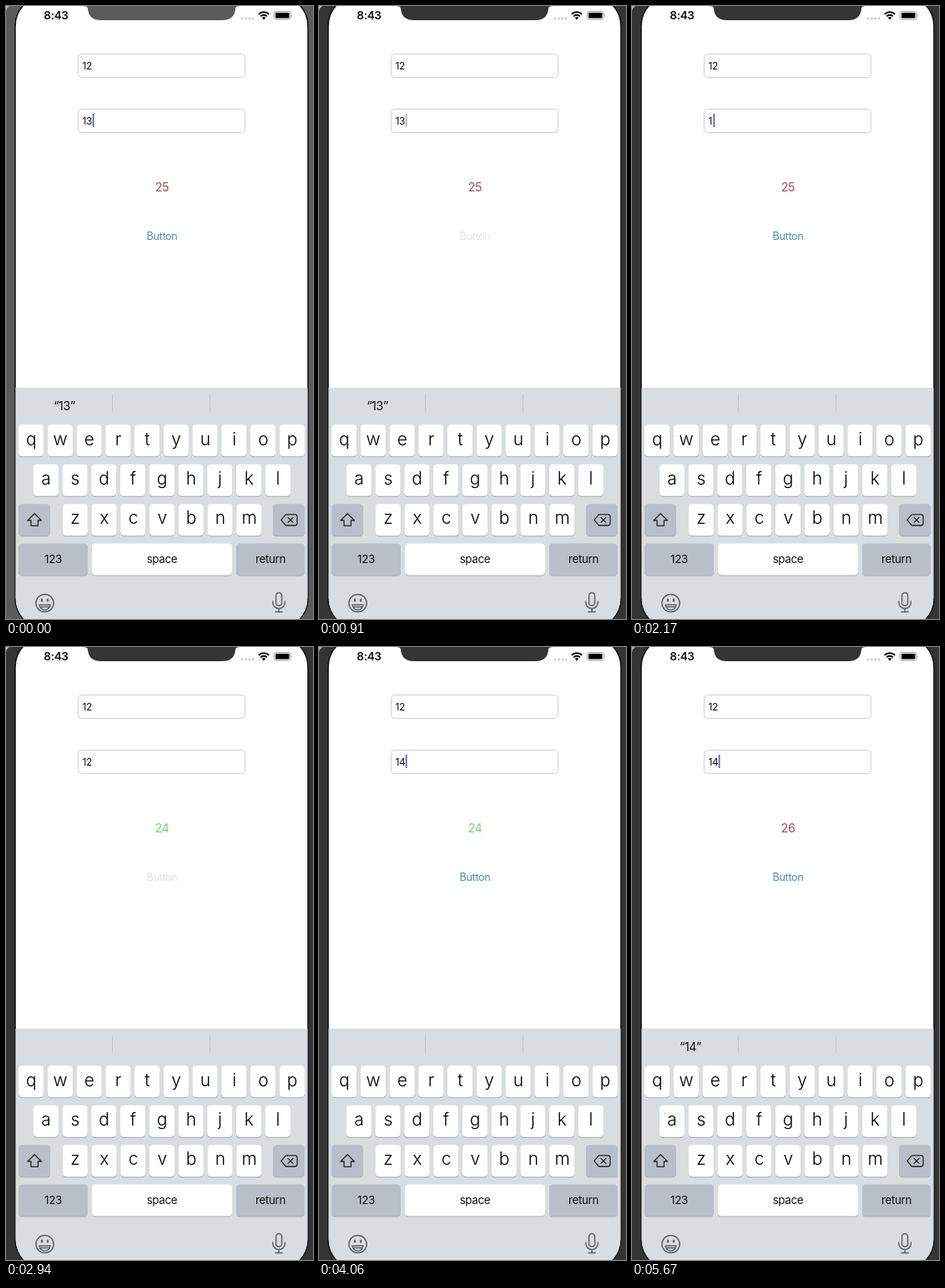
Recreate the animation shown at these times as an HTML page. Size 368x734 px, loop 5.74 s.

```html
<!DOCTYPE html>
<html lang="en">
<head>
<meta charset="utf-8">
<title>Adding two numbers</title>
<style>
  html, body { margin: 0; width: 100%; height: 100%; overflow: hidden; background: #343434; }
  svg { display: block; width: 368px; height: 734px; }
  text { font-family: Inter, "Liberation Sans", sans-serif; fill: #111; letter-spacing: -.025em; }
  .mid { text-anchor: middle; }
  .letter { font-size: 21px; font-weight: 300; fill: #000; }
  .word { font-size: 13.4px; }
  .field { fill: #fff; stroke: #d2d2d2; }
  .input { font-size: 12px; }
  .line { fill: none; stroke: #5f6368; stroke-width: 1.5; stroke-linecap: round; stroke-linejoin: round; }
  .dark { stroke: #26282b; stroke-width: 1.3; }
</style>
</head>
<body>
<svg viewBox="0 0 368 734">
  <defs>
    <clipPath id="screen"><rect x="11.5" y="-12" width="350" height="757" rx="36"/></clipPath>
  </defs>
  <rect id="bezel" width="368" height="734"/>
  <path d="M0 0H4Q1 2 0 6Z" fill="#b5b5b5"/>
  <rect x="11" y="-12.5" width="351" height="758" rx="36.5" fill="#fff" stroke="#141414" stroke-width="1.6"/>

  <g clip-path="url(#screen)">
    <rect x="11" y="457" width="351" height="280" fill="#d9dde0"/>
    <path d="M127.5 465V486M244.5 465V486" stroke="#c5c9cd"/>
    <g id="keys"></g>
  </g>

  <path id="notch" d="M92 0Q98 0 98 3Q99 17 114 17H259Q274 17 275 3Q275 0 281 0Z"/>
  <text x="60" y="16" class="mid" font-size="13.6" font-weight="600">8:43</text>
  <g fill="#c9c9c9">
    <circle cx="283" cy="15" r="1.4"/><circle cx="287.5" cy="15" r="1.4"/>
    <circle cx="292" cy="15" r="1.4"/><circle cx="296" cy="15" r="1.4"/>
  </g>
  <path d="M302.8 9.8a8.8 8.8 0 0 1 12.4 0M305.2 12.4a5.4 5.4 0 0 1 7.6 0" fill="none" stroke="#000" stroke-width="2"/>
  <path d="M309 16.4l-2.2-2.3a3 3 0 0 1 4.4 0z"/>
  <rect x="321.5" y="6.5" width="19.5" height="9.5" rx="2.6" fill="none" stroke="#999"/>
  <rect x="323" y="8" width="16.5" height="6.5" rx="1.3"/>
  <path d="M342.2 9.5q1.5 1.7 0 3.5z" fill="#999"/>

  <rect class="field" x="86.5" y="57.5" width="200" height="28" rx="4"/>
  <rect class="field" x="86.5" y="123.5" width="200" height="28" rx="4"/>
  <text class="input" x="91.5" y="75.5">12</text>
  <text class="input" x="91.5" y="141.5" id="entry"></text>
  <rect id="caret" y="129" width="1.7" height="16" fill="#4a60c8"/>
  <text id="sum" class="mid" x="187" y="222" font-size="14.4"></text>
  <text id="button" class="mid" x="187" y="280" font-size="12.6">Button</text>
  <text id="hint" class="mid" x="70" y="483.5" font-size="14.2"></text>

  <path class="line dark" d="M34.2 607.8L42.4 616H38.4V622.3H30V616H26Z"/>
  <path class="line dark" d="M335.5 608.8H346.5Q349 608.8 349 611.2V619.6Q349 622 346.5 622H335.5L329.8 615.4ZM338 612.4l6 6m0-6l-6 6"/>
  <g class="line">
    <circle cx="46.5" cy="715" r="10.6"/>
    <path d="M40 717H53Q52 723 46.5 723T40 717ZM41.5 719.6H51.5"/>
    <path d="M43 710.6v1.6M50 710.6v1.6" stroke-width="2.4"/>
    <rect x="323.6" y="702.5" width="7" height="15.5" rx="3.5"/>
    <path d="M319.8 713v1.2a7.3 7.3 0 0 0 14.6 0V713M327.1 721.6V725.5M323 725.5H331.2"/>
  </g>
</svg>
<script>
const LOOP = 5740, TICK = 70;
const el = id => document.getElementById(id);

// Keyboard
let markup = '';
function key(x, y, w, label, kind, fill = '#fff') {
  const base = y + (kind === 'letter' ? 24.2 : 23);
  markup += `<rect x="${x}" y="${y + 1}" width="${w}" height="38" rx="4.2" fill="#a9adb3"/>
    <rect x="${x}" y="${y}" width="${w}" height="38" rx="4.2" fill="${fill}"/>
    <text class="mid ${kind}" x="${x + w / 2}" y="${base}">${label}</text>`;
}
const rows = [['qwertyuiop', 15, 501.3], ['asdfghjkl', 32.7, 548.8], ['zxcvbnm', 67.7, 596.2]];
for (const [letters, left, y] of rows)
  [...letters].forEach((c, i) => key(left + i * 34.75, y, 30.2, c, 'letter'));
const GREY = '#b9bfc8';
key(15, 596.2, 38, '', 'word', GREY);
key(320, 596.2, 38, '', 'word', GREY);
key(15, 643.6, 83, '123', 'word', GREY);
key(103, 643.6, 168, 'space', 'word');
key(276, 643.6, 82, 'return', 'word', GREY);
el('keys').innerHTML = markup;

// Timelines: [time, value] pairs
const caretFade = [[0, 1], [350, 1], [630, 0], [770, 0], [1050, 1], [1470, 1], [1680, 0],
  [2029, 0], [2030, 1], [2660, 1], [2940, 0], [3080, 0], [3360, 1], [3500, 1], [3710, 0],
  [3849, 0], [3850, 1], [4550, 1], [4830, 0], [4970, 0], [5250, 1], [5740, 1]];
const buttonFade = [[0, 1], [909, 1], [910, 0], [980, 0], [1400, 1], [2799, 1], [2800, 0],
  [2940, 0], [3430, 1], [4689, 1], [4690, 0], [4900, 0], [5390, 1], [5740, 1]];
const entries = [[0, '13'], [2030, '1'], [2240, '12'], [3850, '1'], [4060, '14']];
const sums = [[0, 25], [2940, 24], [4970, 26]];
const hints = [[0, '“13”'], [2170, ''], [4270, '“14”']];

const held = (track, t) => track.filter(p => p[0] <= t).pop()[1];
function eased(track, t) {
  const i = track.findIndex(p => p[0] > t);
  const [t0, a] = track[i - 1], [t1, b] = track[i];
  return a + (b - a) * (t - t0) / (t1 - t0);
}
const mix = (from, to, k) => `rgb(${from.map((v, i) => Math.round(v + (to[i] - v) * k))})`;

function draw(now) {
  const t = Math.floor(now % LOOP / TICK) * TICK;
  const shade = mix([91, 91, 91], [52, 52, 52], Math.min(1, t / 280));
  el('bezel').style.fill = el('notch').style.fill = shade;

  const entry = held(entries, t), sum = held(sums, t);
  el('entry').textContent = entry;
  el('caret').setAttribute('x', entry.length > 1 ? 103.8 : 97.5);
  el('caret').style.opacity = eased(caretFade, t);
  el('sum').textContent = sum;
  el('sum').style.fill = sum === 24 ? '#70d66c' : '#ae4a47';
  el('button').style.fill = mix([226, 227, 228], [70, 140, 194], eased(buttonFade, t));
  el('hint').textContent = held(hints, t);
}

let start;
function frame(now) {
  start ??= now;
  draw(now - start);
  requestAnimationFrame(frame);
}
draw(0);
requestAnimationFrame(frame);
</script>
</body>
</html>
```
